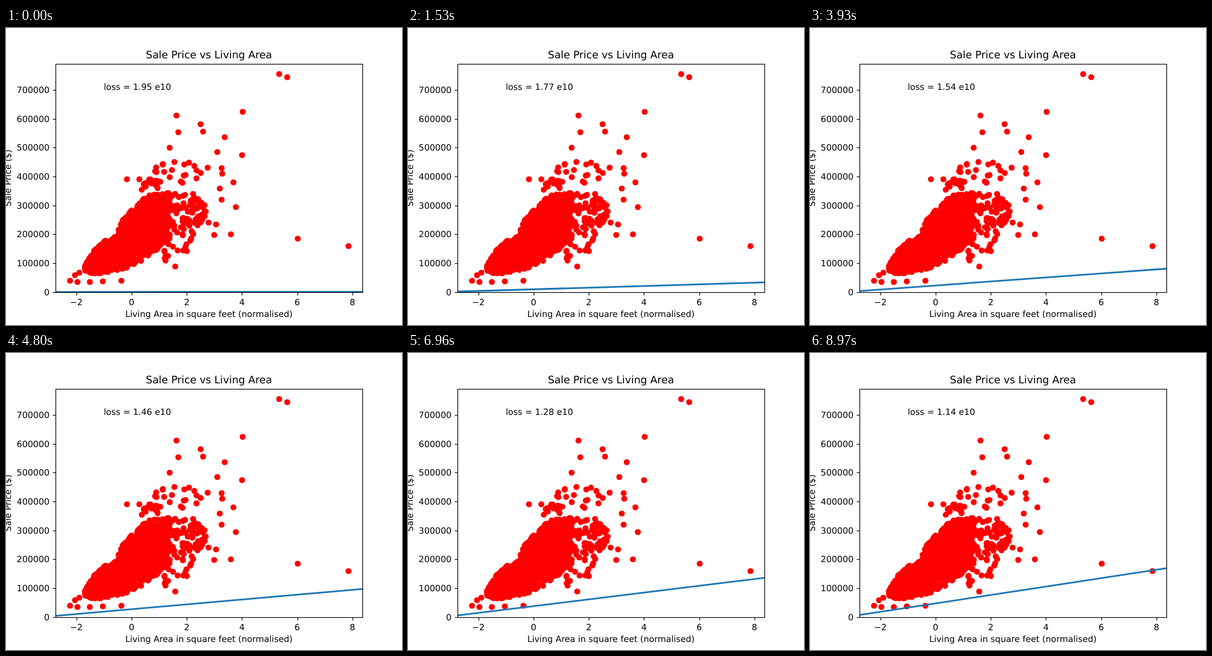
An HTML page for the animation above (9 s loop, 640x480 px).

```html
<!DOCTYPE html>
<html lang="en">
<head>
<meta charset="utf-8">
<title>Sale Price vs Living Area</title>
<style>
  html, body { margin: 0; width: 100%; height: 100%; overflow: hidden; background: #fff; }
  svg { display: block; width: 640px; height: 480px; }
  text { font: 13.89px "DejaVu Sans", sans-serif; text-rendering: geometricPrecision; fill: #000; }
  .title { font-size: 16.67px; }
  .mid { text-anchor: middle; }
  .end { text-anchor: end; }
  .axis { fill: none; stroke: #000; stroke-width: 1.11; }
  .dots { fill: #f00; }
  #fit { stroke: #1f77b4; stroke-width: 2.78; }
</style>
</head>
<body>
<svg viewBox="0 0 640 480">
  <clipPath id="plot"><rect x="80" y="57.6" width="496" height="369.6"/></clipPath>
  <g clip-path="url(#plot)">
    <g class="dots" id="dots"></g>
    <line id="fit" x1="80" x2="576"/>
  </g>
  <text id="loss" x="158" y="100"></text>
  <g id="ticks"></g>
  <rect class="axis" x="80.5" y="58.5" width="496" height="369"/>
  <text class="title mid" x="328" y="49">Sale Price vs Living Area</text>
  <text class="mid" x="328" y="467">Living Area in square feet (normalised)</text>
  <text class="mid" transform="translate(8 242.4) rotate(-90)">Sale Price ($)</text>
</svg>
<script>
const $ = id => document.getElementById(id);
const toX = v => 202.9 + v * 44.62;
const toY = v => 427.2 - v * 46.65e-5;
const mix = (a, b, t) => a + (b - a) * t;

function add(parent, tag, attrs, text = '') {
  const el = document.createElementNS('http://www.w3.org/2000/svg', tag);
  for (const key in attrs) el.setAttribute(key, attrs[key]);
  el.textContent = text;
  parent.append(el);
}

let seed = 7;
function random() {
  seed = (seed * 1664525 + 1013904223) % 4294967296;
  return seed / 4294967296;
}

const dot = (x, y) => add($('dots'), 'circle', { cx: x + .5, cy: y + .5, r: 4.86 });

// Fills a band given by [x, top, bottom] keys; a higher power crowds the left
function scatter(count, power, band) {
  const first = band[0][0], last = band[band.length - 1][0];
  for (let n = 0; n < count; n++) {
    const x = mix(first, last, random() ** power);
    const i = band.findIndex(key => key[0] > x);
    const [a, b] = [band[i - 1], band[i]];
    const t = (x - a[0]) / (b[0] - a[0]);
    dot(x, mix(mix(a[1], b[1], t), mix(a[2], b[2], t), random()));
  }
}

// Dense body, thinning right flank, loose top, high prices
scatter(1200, 1, [[127, 384, 391], [140, 361, 397], [159, 344, 395], [178, 335, 391],
  [187, 310, 389], [210, 287, 382], [230, 268, 367], [265, 266, 342]]);
scatter(105, 1.3, [[255, 264, 376], [276, 266, 372], [292, 260, 362], [301, 266, 338], [323, 288, 300]]);
scatter(16, 1, [[217, 250, 262], [234, 242, 262], [252, 240, 262]]);
scatter(20, 1, [[240, 220, 236], [270, 215, 246], [298, 209, 258], [326, 218, 226]]);

const outliers = [
  441,74, 454,79, 382,135, 275,141, 314,155, 278,168, 318,167, 353,176, 264,193, 341,200, 381,205,
  348,226, 349,235, 367,249, 345,259, 348,277, 371,289, 363,333, 336,334, 339,317, 327,314, 471,340,
  553,352, 103,408, 115,410, 111,399, 118,395, 135,410, 156,409, 186,408, 195,244, 215,244, 273,385
];
for (let i = 0; i < outliers.length; i += 2) dot(outliers[i], outliers[i + 1]);

const ticks = $('ticks');
for (let v = -2; v <= 8; v += 2) {
  const x = Math.round(toX(v));
  add(ticks, 'path', { class: 'axis', d: `M${x + .5} 427.5v4.86` });
  add(ticks, 'text', { class: 'mid', x: toX(v), y: 448 }, String(v).replace('-', '\u2212'));
}
for (let v = 0; v <= 7e5; v += 1e5) {
  const y = Math.floor(toY(v));
  add(ticks, 'path', { class: 'axis', d: `M80.5 ${y + .5}h-4.86` });
  add(ticks, 'text', { class: 'end', x: 70.3, y: y + 5 }, v);
}

// Gradient descent with rate 0.001, one step every 30 ms
function draw() {
  const step = Math.floor(performance.now() % 9000 / 30) + 1;
  const left = 0.999 ** step;
  const fitY = x => toY((1 - left) * (180921 + 56300 * (x - 202.9) / 44.62)) - .6;
  $('fit').setAttribute('y1', fitY(80));
  $('fit').setAttribute('y2', fitY(576));
  $('loss').textContent = `loss = ${(0.157 + 1.795 * left * left).toFixed(2)} e10`;
  requestAnimationFrame(draw);
}
draw();
</script>
</body>
</html>
```
